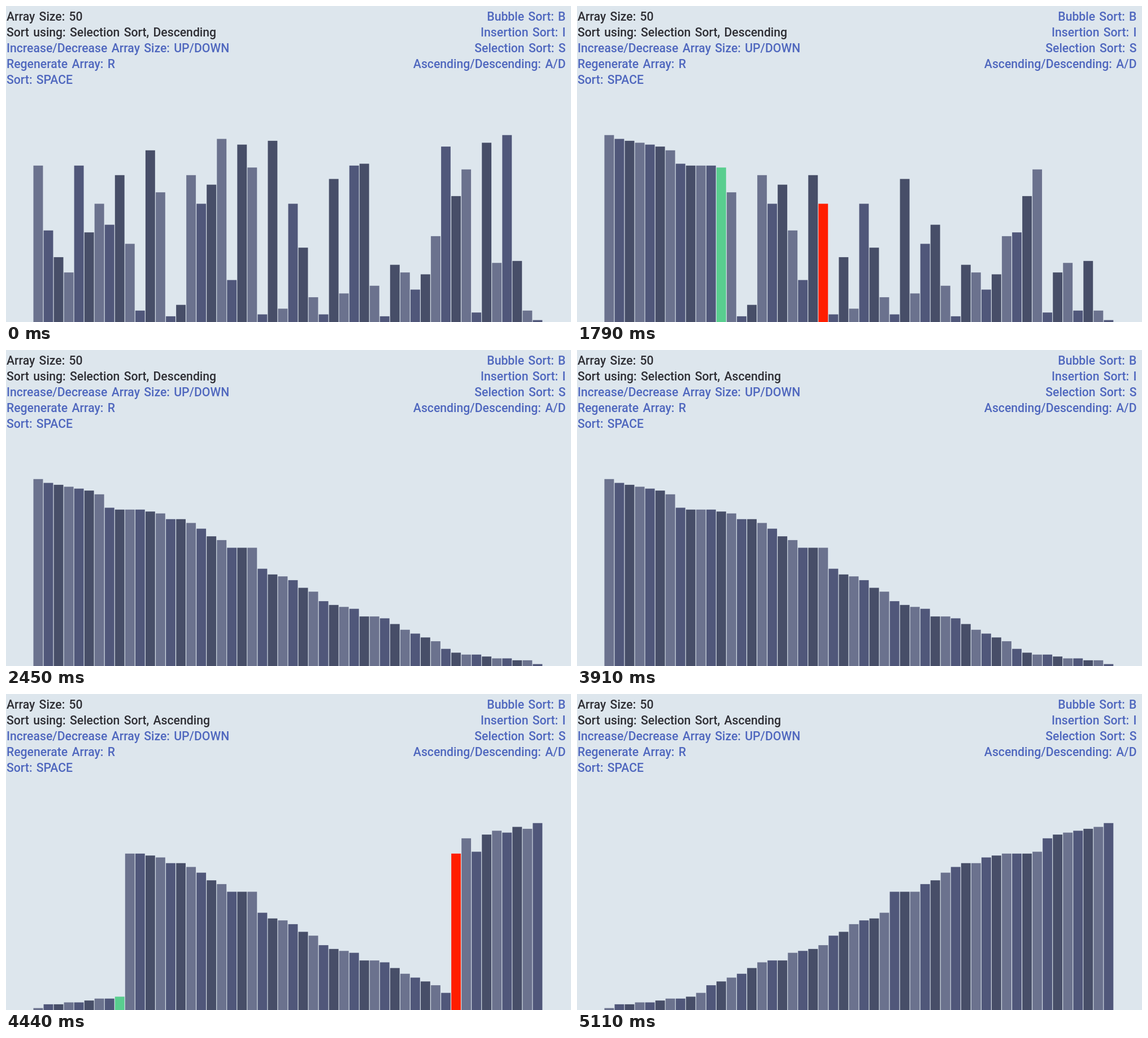
Animation, 1000 px wide and 560 px high, one loop 6.44 s. Source, as an HTML page with a canvas:

```html
<!DOCTYPE html>
<html lang="en">
<head>
<meta charset="utf-8">
<title>Sorting visualizer</title>
<style>
  html, body { margin: 0; width: 100%; height: 100%; overflow: hidden; background: #dde6ed; }
  canvas { position: absolute; left: 0; top: 0; width: 1000px; height: 560px; }
  .panel {
    position: absolute; top: 4.5px; white-space: pre; word-spacing: 2px;
    font: 500 21.2px/28.2px Roboto, sans-serif; color: #4f67be;
  }
  .left { left: 1px; }
  .right { left: 590px; width: 400.5px; text-align: right; }
  .status { color: #2e2e34; }
</style>
</head>
<body>
<canvas id="stage" width="887" height="497"></canvas>
<div class="panel left"><div class="status">Array Size: 50</div><div class="status">Sort using: Selection Sort, <span id="order">Descending</span></div><div>Increase/Decrease Array Size: UP/DOWN</div><div>Regenerate Array: R</div><div>Sort: SPACE</div></div>
<div class="panel right"><div>Bubble Sort: B</div><div>Insertion Sort: I</div><div>Selection Sort: S</div><div>Ascending/Descending: A/D</div></div>
<script>
const LOOP = 6440, STEP = 66.4;
const DESC_START = 1653, ORDER_SWITCH = 3910, ASC_START = 4307;
const BAR = { left: 43, pitch: 16, width: 15, unit: 3 };
const SHADES = ['#6b728e', '#50577a', '#474e68'];
const GREEN = '#59ce8f', RED = '#ff1e00';

const values = [
  82, 48, 34, 26, 82, 47, 62, 51, 77, 41, 6, 90, 68, 3, 9, 77, 62,
  72, 96, 22, 93, 81, 4, 95, 7, 62, 39, 13, 4, 75, 15, 82, 83, 19,
  3, 30, 26, 17, 25, 45, 92, 66, 80, 5, 94, 31, 98, 32, 6, 1
];
const LAST = values.length - 1;
const descending = (a, b) => a > b;
const ascending = (a, b) => a < b;

const stage = document.getElementById('stage');
const ctx = stage.getContext('2d');
const orderLabel = document.getElementById('order');

// Selection sort through pass `current`; highlights vanish once it is finished.
function selectionSort(source, before, current) {
  const bars = source.slice();
  let picked = -1;
  for (let i = 0; i <= Math.min(current, LAST - 1); i++) {
    picked = i;
    for (let j = i + 1; j <= LAST; j++) {
      if (before(bars[j], bars[picked])) picked = j;
    }
    [bars[i], bars[picked]] = [bars[picked], bars[i]];
  }
  return current < LAST ? { bars, current, picked } : { bars, current: -1, picked: -1 };
}

const sorted = selectionSort(values, descending, LAST).bars;

function stateAt(time) {
  const t = Math.floor(time / 10) * 10;
  const tick = start => Math.floor((t - start) / STEP);
  if (t < DESC_START) return selectionSort(values, descending, -1);
  if (t < ASC_START) return selectionSort(values, descending, 3 + 4 * tick(DESC_START));
  return selectionSort(sorted, ascending, Math.round(4.1 * tick(ASC_START)));
}

function draw(time) {
  const { bars, current, picked } = stateAt(time);
  ctx.fillStyle = '#dde6ed';
  ctx.fillRect(0, 0, stage.width, stage.height);
  bars.forEach((value, i) => {
    const height = value * BAR.unit;
    ctx.fillStyle = i === current ? GREEN : i === picked ? RED : SHADES[i % 3];
    ctx.fillRect(BAR.left + i * BAR.pitch, stage.height - height, BAR.width, height);
  });
  const label = time < ORDER_SWITCH ? 'Descending' : 'Ascending';
  if (orderLabel.textContent !== label) orderLabel.textContent = label;
}

const begin = performance.now();
function frame() {
  draw((performance.now() - begin) % LOOP);
  requestAnimationFrame(frame);
}
frame();
</script>
</body>
</html>
```
